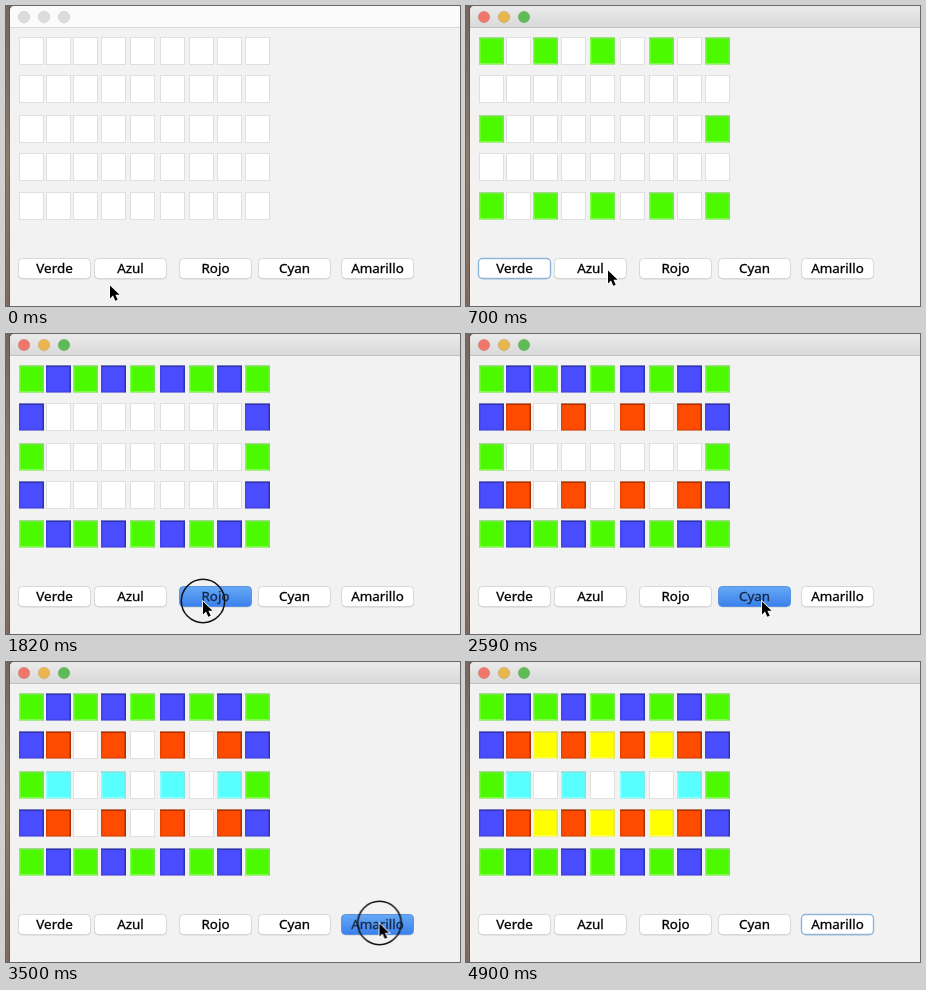
Animation, 454 px wide and 300 px high, one loop 5040 ms. Source, as an HTML page:

```html
<!DOCTYPE html>
<html lang="es">
<head>
<meta charset="utf-8">
<title>Colores</title>
<style>
  html, body { margin: 0; width: 100%; height: 100%; overflow: hidden; background: #f2f2f2; }
  svg { display: block; width: 454px; height: 300px; }
  text { font: 13.4px "Noto Sans", "Open Sans", sans-serif; text-anchor: middle; stroke-width: .3px; }
</style>
</head>
<body>
<svg id="stage" viewBox="0 0 454 300">
  <defs>
    <linearGradient id="desk" x2="0" y2="1">
      <stop offset="0" stop-color="#75675c"/>
      <stop offset=".5" stop-color="#8d7b6c"/>
      <stop offset="1" stop-color="#7d6a5c"/>
    </linearGradient>
    <linearGradient id="bar" x2="0" y2="1">
      <stop offset="0" stop-color="#ebebeb"/>
      <stop offset="1" stop-color="#d9d9d9"/>
    </linearGradient>
    <linearGradient id="blue" x2="0" y2="1">
      <stop offset="0" stop-color="#66a9f5"/>
      <stop offset="1" stop-color="#3a80ec"/>
    </linearGradient>
  </defs>
  <rect width="454" height="300" fill="url(#desk)"/>
  <rect x="3" y="1" width="1" height="299" fill="#000" opacity=".18"/>
  <path d="M4 300V5Q4 0 9 0H454V300Z" fill="#f2f2f2"/>
  <g id="idle">
    <path d="M4 21V5Q4 0 9 0H454V21Z" fill="#fbfbfb"/>
    <path d="M4 21.5H454" stroke="#d9d9d9"/>
  </g>
  <g id="active">
    <path d="M4 21V5Q4 0 9 0H454V21Z" fill="url(#bar)"/>
    <path d="M4 21.5H454" stroke="#c2c2c2"/>
  </g>
  <g id="cells"></g>
  <g id="buttons"></g>
  <g id="pointer">
    <circle id="ring" r="21.7" fill="none" stroke="#111" stroke-width="1.5"/>
    <path d="M0 .5V13.4L3 10.6L5.3 15.8L7.7 14.7L5.4 9.7H9.6Z" fill="#000" stroke="#fff" stroke-width="1.6" paint-order="stroke"/>
  </g>
</svg>
<script>
const TICKS = 72, LOOP = 5040;
const $ = id => document.getElementById(id);
const at = tick => tick <= 0 ? 0 : tick >= TICKS ? 1 : (tick - 0.03) / TICKS;

function add(parent, tag, attrs, text) {
  const el = document.createElementNS("http://www.w3.org/2000/svg", tag);
  for (const k in attrs) el.setAttribute(k, attrs[k]);
  if (text) el.textContent = text;
  return parent.appendChild(el);
}

function loop(el, frames) {
  el.animate(frames, { duration: LOOP, iterations: Infinity });
}

// Visible only during the given [from, to] spans, in ticks of 70 ms.
function show(el, ...spans) {
  const frames = [];
  const put = (opacity, tick) => frames.push({ opacity, offset: at(tick) });
  let last = 0;
  for (const [from, to] of spans) {
    if (from > 0) { put(0, last); put(0, from); }
    put(1, from);
    put(1, to);
    last = to;
  }
  if (last < TICKS) { put(0, last); put(0, TICKS); }
  loop(el, frames);
}

// "edge" tints the inner rim of a field, "side" its top and right.
const light = { edge: "rgba(255,255,255,.3)", side: "rgba(90,90,90,.15)" };
const dark = { edge: "rgba(0,0,0,.1)", side: "rgba(0,0,0,.25)" };
const buttons = [
  { label: "Verde",    x: 12,  color: "#4cfa00", rim: light, ring: [4, 6],   press: 5,  paint: 7 },
  { label: "Azul",     x: 88,  color: "#4a4dff", rim: dark,  ring: [12, 14], press: 13, paint: 16 },
  { label: "Rojo",     x: 173, color: "#ff4b00", rim: dark,  ring: [24, 27], press: 26, paint: 29 },
  { label: "Cyan",     x: 252, color: "#58ffff", rim: light, ring: [35, 37], press: 36, paint: 38 },
  { label: "Amarillo", x: 335, color: "#ffff00", rim: light, ring: [49, 52], press: 50, paint: 54 }
];

// Title bar
show($("idle"), [0, 5]);
show($("active"), [5, TICKS]);
["#f0766c", "#e9b64d", "#5dbb58"].forEach((color, i) => {
  const dot = { cx: 18 + 20 * i, cy: 11, r: 5.8, "stroke-opacity": .1, stroke: "#000", "stroke-width": .8 };
  add($("idle"), "circle", { ...dot, fill: "#dcdcdc" });
  add($("active"), "circle", { ...dot, fill: color });
});

// Grid of fields
const cols = [13, 40, 67, 95, 124, 154, 183, 211, 239];
const rows = [31, 69, 109, 147, 186];

function colorOf(r, c) {
  if (r % 4 === 0 || c % 8 === 0) return (r + c) % 2;
  if (r === 2) return c % 2 ? 3 : -1;
  return c % 2 ? 2 : 4;
}

rows.forEach((y, r) => cols.forEach((x, c) => {
  add($("cells"), "rect", { x: x + .5, y: y + .5, width: 24, height: 27, fill: "#fff", stroke: "#dfdfdf" });
  const b = buttons[colorOf(r, c)];
  if (!b) return;
  const g = add($("cells"), "g", {});
  add(g, "rect", { x, y: y + .5, width: 25, height: 27, fill: b.color });
  add(g, "rect", { x: x + .75, y: y + 1.25, width: 23.5, height: 25.5, fill: "none", stroke: b.rim.edge, "stroke-width": 1.5 });
  add(g, "path", { d: `M${x} ${y + 1.25}H${x + 24.25}V${y + 27.5}`, fill: "none", stroke: b.rim.side, "stroke-width": 1.5 });
  show(g, [b.paint, TICKS]);
}));

// Buttons
buttons.forEach((b, i) => {
  const root = $("buttons");
  const box = { x: b.x + .5, y: 252.5, width: 72, height: 20, rx: 4 };
  const label = fill => [{ x: b.x + 36.5, y: 267, fill, stroke: fill }, b.label];
  add(root, "rect", { ...box, y: 253, fill: "#c8c8c8", stroke: "#d0d0d0" });
  add(root, "rect", { ...box, fill: "#fff", stroke: "#d8d8d8" });
  const focus = add(root, "rect", { ...box, fill: "#fff", stroke: "#8fb5de", "stroke-width": 1.4 });
  add(root, "text", ...label("#000"));
  const press = add(root, "g", {});
  add(press, "rect", { ...box, fill: "url(#blue)", stroke: "#5a92e2" });
  add(press, "text", ...label("#15294a"));
  const next = buttons[i + 1];
  show(focus, [b.paint, next ? next.press : TICKS]);
  show(press, [b.press, b.paint]);
});

// Pointer: [tick, x, y]
const path = [
  [0, 104, 279], [1, 102, 278], [4, 57, 265], [7, 57, 265], [10, 142, 264],
  [12, 141, 266], [18, 140, 266], [22, 197, 267], [30, 197, 267], [34, 296, 267],
  [39, 296, 267], [41, 349, 264], [45, 373.5, 261], [56, 373.5, 261], [62, 382, 304], [72, 382, 304]
];
loop($("pointer"), path.map(([tick, x, y]) => ({
  offset: tick / TICKS, transform: `translate(${x}px, ${y}px)`, easing: "ease-in-out"
})));
show($("ring"), ...buttons.map(b => b.ring));
</script>
</body>
</html>
```
